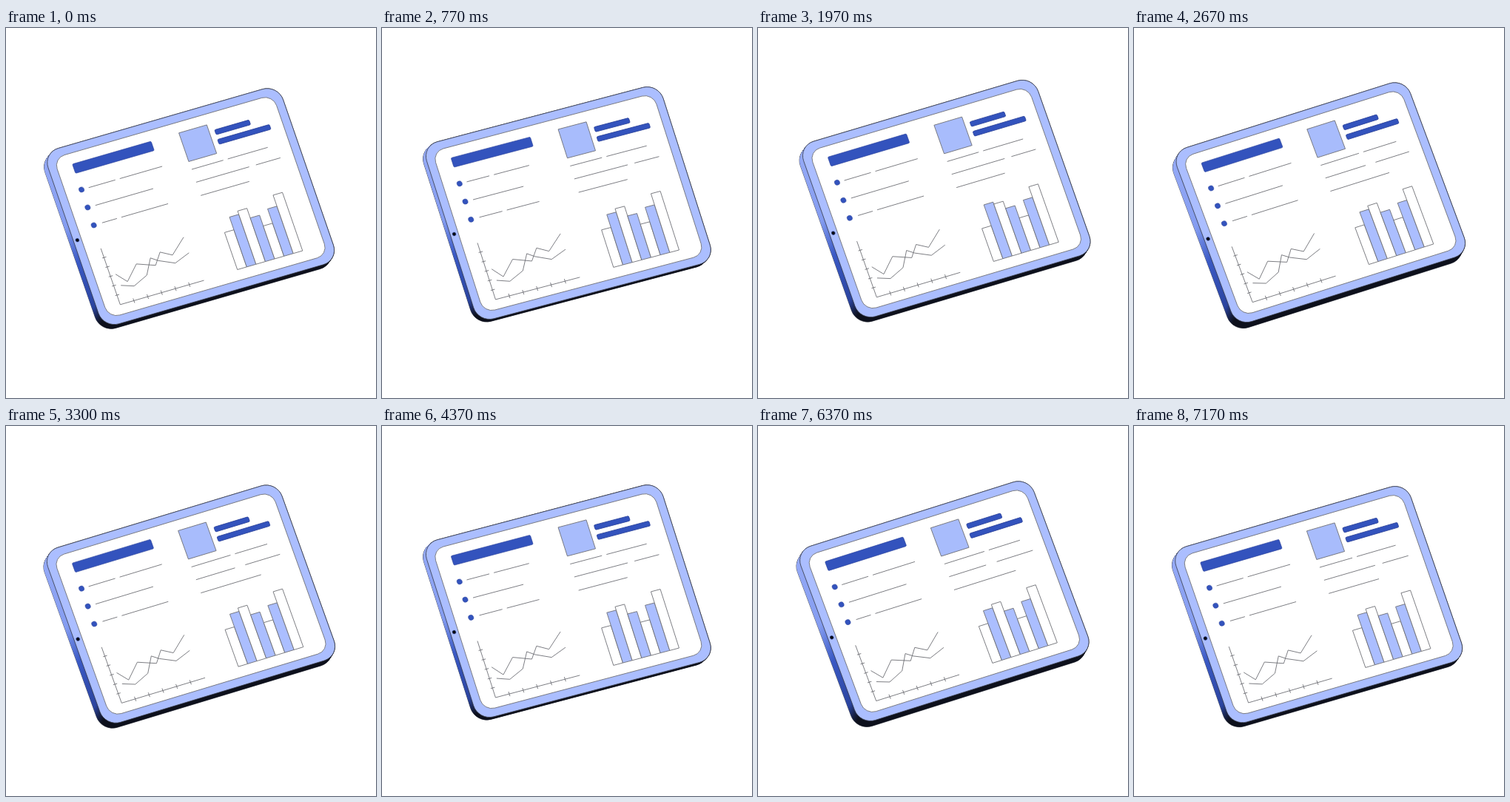
Animation of 500x500 px, one loop 7.21 s. Source, as an HTML page with a canvas:

```html
<!DOCTYPE html>
<html lang="en">
<head>
<meta charset="utf-8">
<title>Tablet report</title>
<style>
  html, body { margin: 0; width: 100%; height: 100%; overflow: hidden; background: #fff; }
  canvas { display: block; width: 500px; height: 500px; }
</style>
</head>
<body>
<canvas id="stage" width="500" height="500"></canvas>
<script>
const ctx = document.getElementById('stage').getContext('2d');

const PERIOD = 3605;
const W = 308.6, H = 228.6, BEZEL = 11;
const LIGHT = '#abbeff', BLUE = '#3353bd', NAVY = '#2a419a';
const LINE = '#6c6d73', EDGE = '#33363f';

// The tablet bobs along a slanted line while it rocks about its centre
function place(angle, depth) {
  const bob = Math.cos(angle + 0.06), rock = Math.sin(angle);
  const x = 253.3 - 2.6 * bob + (0.4 * rock - 4.3) * depth;
  const y = 235.5 + 5.5 * bob + (5.8 - 2.3 * rock) * depth;
  ctx.setTransform(1, 0, 0, 1, x, y);
  ctx.rotate(0.0242 * rock - 0.2817);
  ctx.transform(1, 0, 0.051, 1, 0, 0);
  ctx.translate(-155.8, -114.4);
}

// Each third of the period swells one part of the page
function pulse(t, third) {
  const p = (t % PERIOD) / PERIOD * 3 - third;
  return p > 0 && p < 1 ? Math.sin(Math.PI * p) : 0;
}

function paint(fill, stroke, width = 0.8) {
  if (fill) { ctx.fillStyle = fill; ctx.fill(); }
  if (stroke) { ctx.strokeStyle = stroke; ctx.lineWidth = width; ctx.stroke(); }
}

function box(x, y, w, h, r, fill, stroke, width) {
  ctx.beginPath();
  ctx.roundRect(x, y, w, h, r);
  paint(fill, stroke, width);
}

function dot(x, y, r, fill) {
  ctx.beginPath();
  ctx.arc(x, y, r, 0, 2 * Math.PI);
  paint(fill, NAVY, 0.5);
}

function polyline(...points) {
  ctx.beginPath();
  points.forEach(([x, y]) => ctx.lineTo(x, y));
  paint(null, LINE);
}

// A line of text from x to end, optionally broken by a space
function row(y, x, end, space = end, gap = 6.3) {
  polyline([x, y], [space, y]);
  if (space < end) polyline([space + gap, y], [end, y]);
}

function body(fill, stroke) {
  box(0.5 - BEZEL, -BEZEL, W + 2 * BEZEL, H + 2 * BEZEL, 21.5, fill, stroke, 0.7);
}

function drawSide(angle) {
  const shade = ctx.createLinearGradient(0, 0, 0, H);
  shade.addColorStop(0, '#94a9f6');
  shade.addColorStop(0.4, '#849cf0');
  shade.addColorStop(0.62, '#3a59c4');
  shade.addColorStop(0.9, '#2b449f');
  shade.addColorStop(1, '#0d101c');
  for (const [fill, stroke] of [[null, EDGE], [shade, null]]) {
    for (let depth = 1; depth > 0; depth -= 0.1) {
      place(angle, depth);
      body(fill, stroke);
    }
  }
}

function drawTitles() {
  box(22, 14.8, 110.8, 13.2, 1.5, BLUE, NAVY, 0.6);
  box(172, 14.4, 39.3, 40.8, 0, '#a8bcfc', LINE);
  box(219, 23.8, 48.5, 6.8, 1.5, BLUE, NAVY);
  box(218.5, 37.4, 73, 6.8, 1.5, BLUE, NAVY);
}

function drawList(swell) {
  for (let i = 0; i < 3; i++) dot(22.5, 51.4 + 25.4 * i, 3.5, BLUE);
  row(51.5, 32.5, 136 - 18 * swell, 70 - 6.5 * swell);
  row(77, 33.3, 114.6 - 12 * swell);
  row(102.2, 34.2, 127 - 10 * swell, 55 + 12.5 * swell);
}

function drawParagraph(swell) {
  row(66.5, 172.4, 279.3, 216.8 + 15 * swell);
  row(84.8, 172.4, 290.9, 247 - 27.5 * swell, 9.5 + 7 * swell);
  row(103.8, 172.4, 240.7 + 23.5 * swell);
}

function drawTrends() {
  polyline([21.2, 135], [21.2, 215.2], [139, 215.2]);
  for (let i = 0; i < 5; i++) {
    const x = 40.4 + 19.5 * i, y = 148 + 13.4 * i;
    polyline([x, 212], [x, 218.4]);
    polyline([18.8, y], [24.4, y]);
  }
  polyline([28.7, 174], [40.7, 188], [59.8, 168.5], [83.8, 177.5], [95.3, 162], [110, 170.5], [132, 151.5]);
  polyline([30.5, 190.5], [47.2, 196.3], [68.2, 187], [80.4, 166], [89.5, 172.5], [110, 182], [132, 173.8]);
}

// Neighbouring bars swell in opposite ways, less and less to the right
function drawBars(swell) {
  const w = 13.1;
  [53, 71.2, 76, 62.3, 47, 67.5, 83.3].forEach((rest, i) => {
    const shift = (i % 2 ? 6.5 : -6.5) * 0.3 ** (i >> 1);
    const h = rest + shift * swell;
    box(186.5 + w * i, 213.8 - h, w, h, 0, i % 2 ? LIGHT : '#fff', LINE);
  });
}

function draw(t) {
  const angle = 2 * Math.PI * t / PERIOD;
  ctx.setTransform(1, 0, 0, 1, 0, 0);
  ctx.fillStyle = '#fff';
  ctx.fillRect(0, 0, 500, 500);
  drawSide(angle);
  place(angle, 0);
  body(LIGHT, EDGE);
  box(0.5, 0, W, H, 15.5, '#fff', LINE);
  dot(-5.2, 115.4, 2.4, '#0b0c12');
  drawTitles();
  drawList(pulse(t, 0));
  drawBars(pulse(t, 1));
  drawParagraph(pulse(t, 2));
  drawTrends();
}

const start = performance.now();
function tick() {
  draw((performance.now() - start) % (2 * PERIOD));
  requestAnimationFrame(tick);
}
tick();
</script>
</body>
</html>
```
